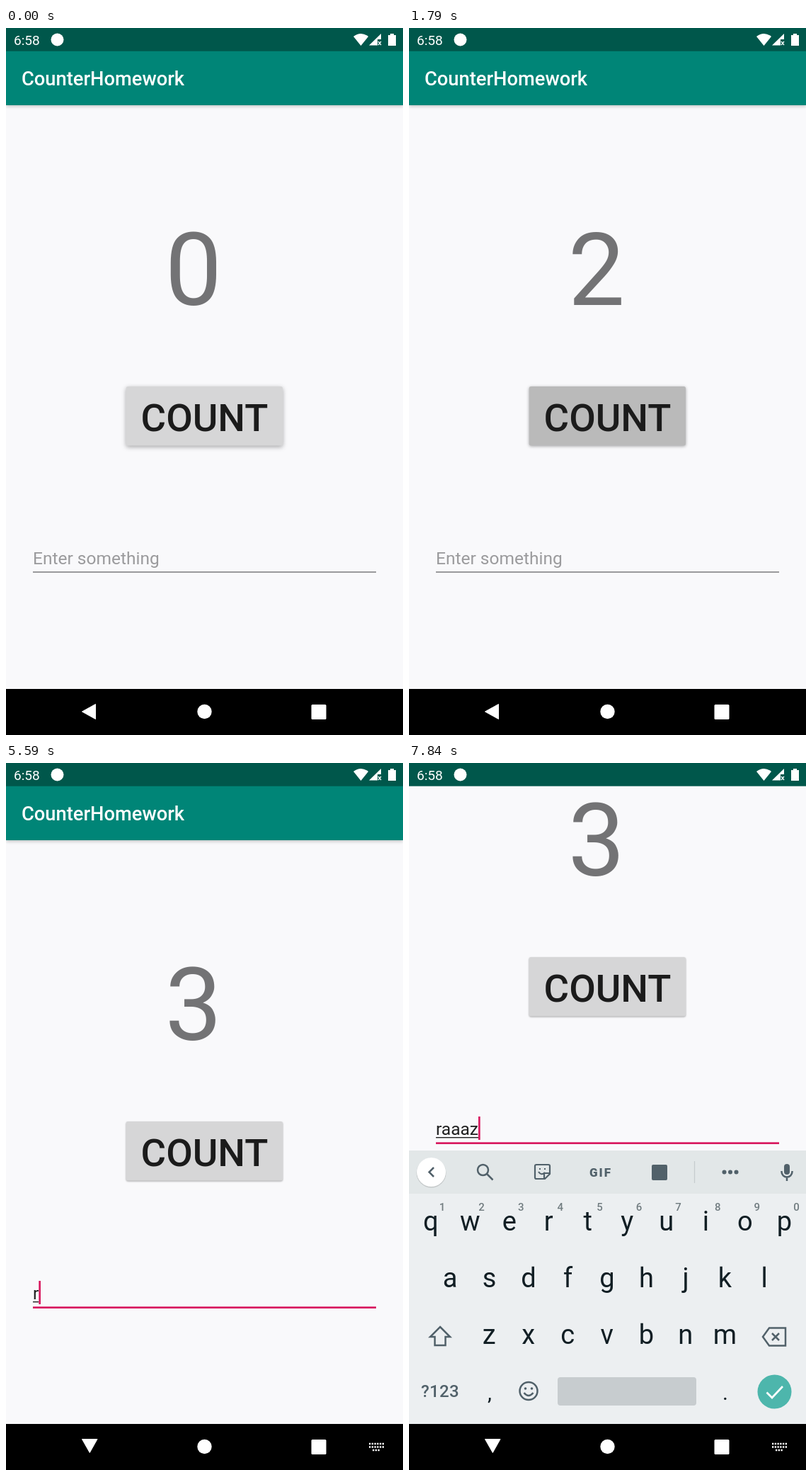
An HTML page that plays this animation: 561x998 px, repeating every 8 s.

```html
<!DOCTYPE html>
<html lang="en">
<head>
<meta charset="utf-8">
<title>Counter app</title>
<style>
  html, body { margin: 0; width: 561px; height: 998px; overflow: hidden; background: #000; }
  svg { display: block; font-family: Roboto, sans-serif; }
  .mid { text-anchor: middle; }
  .medium { font-weight: 500; }
  .line { fill: none; stroke: #51616a; stroke-width: 2.5; }
  #bar { filter: drop-shadow(0 2px 2px #0003); }
</style>
</head>
<body>
<svg width="561" height="998" viewBox="0 0 561 998">
  <g id="app">
    <rect width="561" height="933" fill="#f9f9fb"/>
    <rect id="bar" width="561" height="109" fill="#008577"/>
    <text class="medium" x="22" y="81" font-size="27.3" fill="#fff">CounterHomework</text>
    <text id="count" class="mid" x="265" y="391" font-size="143" fill="#737375">0</text>
    <rect id="button" x="169.7" y="506" width="221.3" height="83.5" rx="2.7" fill="#d6d6d7"/>
    <rect id="ripple" x="169.7" y="506" width="221.3" height="83.5" rx="2.7" opacity="0"/>
    <text class="mid medium" x="280.5" y="569" font-size="54.5" fill="#1b1b1b">COUNT</text>
    <text id="hint" x="38" y="757" font-size="24.5">Enter something</text>
    <text id="typed" x="38" y="757" font-size="24.5" fill="#212121"></text>
    <rect id="composing" x="38" y="760" height="1.4" fill="#212121"/>
    <rect id="underline" x="38" y="767.3" width="485"/>
    <rect id="caret" y="731" width="2.7" height="33" fill="#d81b60"/>
  </g>

  <g fill="#fff">
    <rect width="561" height="32.7" fill="#00574b"/>
    <text x="11" y="24" font-size="19.1">6:58</text>
    <circle cx="72.5" cy="16.5" r="9"/>
    <path d="M491 12Q501.500 4 512 12L501.500 25z"/>
    <path d="M513 24.500L530 8v8h-5v8.500z"/>
    <path d="M526 19l4 5m0-5l-4 5" stroke="#fff" stroke-width="1.300"/>
    <path d="M540 10h3v-2h5v2h3v15h-11z"/>
  </g>

  <g id="keyboard">
    <rect y="547" width="561" height="386" fill="#eceff1"/>
    <rect y="547" width="561" height="61" fill="#e2e7e8"/>
    <circle cx="31.5" cy="578.5" r="21" fill="#0002"/>
    <circle cx="31.500" cy="577.500" r="20.500" fill="#fff"/>
    <g class="line">
      <path d="M35 571l-6.500 6.500 6.500 6.500"/>
      <circle cx="104.5" cy="574.500" r="7.500"/>
      <path d="M110 580l8.500 8.500"/>
      <path d="M180 567h17a2 2 0 0 1 2 2v11l-7 7h-12a2 2 0 0 1-2-2v-16a2 2 0 0 1 2-2zM199 579h-8v8M183 577q4 6 9 1M184 573h2m5 0h2" stroke-width="2.200"/>
      <path d="M403.500 562v31" stroke="#c5cccf" stroke-width="1.300"/>
      <path d="M526.500 576v1a7.500 7.500 0 0 0 15 0v-1M534 585v5"/>
      <path d="M44 796l14 14h-6.500v12h-15v-12H30z"/>
      <path d="M500 810l9-12.500h23v25h-23zM513 805l10 10m0-10l-10 10"/>
      <circle cx="169" cy="886.500" r="12.500"/>
      <path d="M162.500 889q6.500 8 13 0"/>
    </g>
    <g fill="#51616a">
      <text class="mid" x="271" y="583.500" font-size="17" font-weight="900" letter-spacing="2">GIF</text>
      <rect x="343" y="567" width="22" height="22" rx="2"/>
      <circle cx="445.500" cy="577.500" r="3"/><circle cx="454" cy="577.500" r="3"/><circle cx="462.500" cy="577.500" r="3"/>
      <rect x="530" y="566" width="8" height="15" rx="4"/>
      <circle cx="164.500" cy="883" r="1.800"/><circle cx="173.500" cy="883" r="1.800"/>
      <text class="mid medium" x="44" y="895" font-size="24" letter-spacing=".4">?123</text>
    </g>
    <g id="keys" class="mid" font-size="38" fill="#111e24">
      <text x="114" y="899" font-size="30">,</text>
      <text x="447" y="899" font-size="30">.</text>
    </g>
    <rect x="210" y="867" width="196" height="40" rx="4" fill="#c7cccf"/>
    <circle cx="516.500" cy="887.500" r="24" fill="#4db6ac"/>
    <path d="M505.500 888.500l7.500 7.500 15-16" fill="none" stroke="#fff" stroke-width="2.700"/>
  </g>

  <g fill="#fff">
    <path id="back" stroke="#fff" stroke-linejoin="round"/>
    <circle cx="280.500" cy="965" r="10.200"/>
    <rect x="431.500" y="955" width="21" height="21" rx="1.500"/>
    <path id="switcher" d="M513 961h21M513 965.500h21M518 970h11" stroke="#fff" stroke-width="2.300"/>
  </g>
</svg>
<script>
const $ = id => document.getElementById(id);
const set = (id, attrs) => {
  for (const name in attrs) $(id).setAttribute(name, attrs[name]);
};
const clamp = v => Math.min(1, Math.max(0, v));
const ramp = (t, from, to) => clamp((t - from) / (to - from));
// Latest value whose start time has passed.
const at = (t, steps) => steps.filter(([start]) => t >= start).pop()[1];

const LOOP = 8000;
const COUNTS = [[0, 0], [1250, 1], [1700, 2], [2880, 3]];
const TYPING = [[0, ''], [5500, 'r'], [5790, 'ra'], [5880, 'raa'], [7460, 'raaa'], [7750, 'raaaz']];
const CARET = [[0, 0], [4050, 1], [4590, 0], [5090, 1], [6590, 0], [6880, 1]];
// Press start, fade start, fade end
const PRESSES = [[1090, 1250, 1420], [1580, 2710, 2790], [2790, 2960, 3400]];

function addKey(char, x, y, attrs = {}) {
  const key = document.createElementNS('http://www.w3.org/2000/svg', 'text');
  key.textContent = char;
  for (const [name, value] of Object.entries({ x, y, ...attrs })) key.setAttribute(name, value);
  $('keys').append(key);
}
[['qwertyuiop', 30.8, 659.5], ['asdfghjkl', 58, 740], ['zxcvbnm', 113.3, 820]].forEach(([row, x, y]) =>
  [...row].forEach((char, i) => addKey(char, x + i * 55.5, y)));
[...'1234567890'].forEach((digit, i) =>
  addKey(digit, 47 + i * 55.6, 632, { 'font-size': 15, 'font-weight': 500, fill: '#717c80' }));

function draw(t) {
  const pan = 232 * (1 - (1 - ramp(t, 6010, 6165)) ** 2);
  set('app', { transform: `translate(0 ${t < 6040 ? 0 : -pan})` });

  $('count').textContent = at(t, COUNTS);
  const pressed = Math.max(...PRESSES.map(([down, up, end]) =>
    Math.min(ramp(t, down, down + 80), 1 - ramp(t, up, end))));
  const lift = Math.max(pressed * 0.4, 1 - ramp(t, 250, 900));
  set('ripple', { opacity: pressed * 0.135 });
  $('button').style.filter = `drop-shadow(0 ${1 + 1.5 * lift}px ${1.3 + 2 * lift}px #0005)`;

  const focused = t >= 4050;
  const text = at(t, TYPING);
  $('typed').textContent = text;
  const width = text ? $('typed').getComputedTextLength() : 0;
  set('hint', { opacity: text ? 0 : 1, fill: focused ? '#757577' : '#9b9b9d' });
  set('composing', { width });
  set('caret', { x: 38 + width, opacity: at(t, CARET) });
  set('underline', { height: focused ? 2.7 : 1.4, fill: focused ? '#d81b60' : '#727274' });

  const shown = ramp(t, 7540, 7620);
  set('keyboard', {
    opacity: t < 7460 ? 0 : 0.86 + 0.14 * shown,
    transform: `translate(0 ${12 * (1 - shown)})`
  });

  const imeActive = t >= 4750;
  set('back', { d: imeActive ? 'M107.500 954.500h21.500l-10.700 19z' : 'M126.500 954.500v21l-19-10.500z' });
  set('switcher', { opacity: imeActive ? 1 : 0, 'stroke-dasharray': '2.3 1.44' });
}

function frame() {
  draw(performance.now() % LOOP);
  requestAnimationFrame(frame);
}
frame();
</script>
</body>
</html>
```
